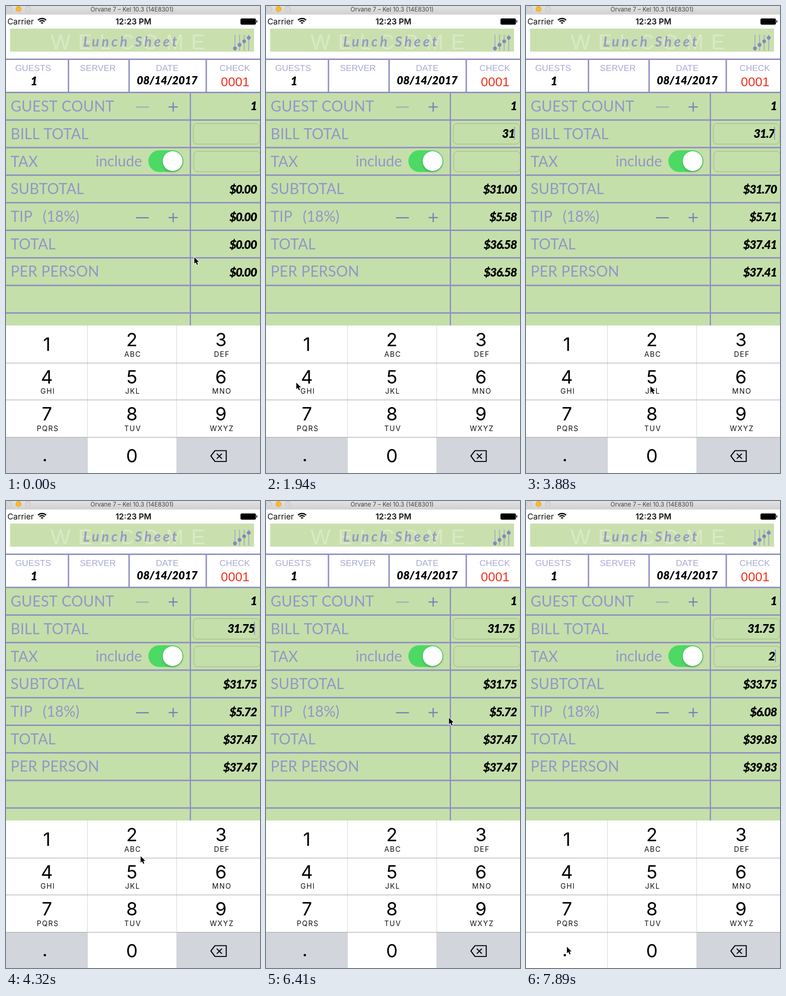
These frames come from a looping animation (553x1013 px, 8000 ms). An HTML page with a canvas:

```html
<!DOCTYPE html>
<html lang="en">
<head>
<meta charset="utf-8">
<title>Bill calculator</title>
<style>
  html, body { margin: 0; width: 100%; height: 100%; overflow: hidden; background: #fff; }
  canvas { display: block; }
</style>
</head>
<body>
<canvas id="stage" width="553" height="1013"></canvas>
<script>
const ctx = document.getElementById('stage').getContext('2d');
const LOOP = 8000, TICK = 149, LAST_TICK = 53, BLINK = 1000 / TICK;
const GREEN = '#c5dfaa', LINE = '#8d8dc4', LABEL = '#9396c9', DARK = '#7d7dba', GREY = '#d2d5db';
const HAND = 'Lato, sans-serif', SANS = '"Liberation Sans", sans-serif', UI = 'Inter, sans-serif';
const ROW = 59.8, KEY_TOP = 693, KEY_HEIGHT = 80.7;

// Each tap: the pointer leaves the last place, arrives, presses one tick later and lets go (in ticks)
const start = { x: 409, y: 544 };
const taps = [
  { key: '3', leave: 0, arrive: 6, release: 9, x: 455, y: 757 },
  { key: '1', leave: 8, arrive: 11, release: 12, x: 55, y: 738 },
  { key: '.', leave: 12, arrive: 15, release: 18, x: 85, y: 972 },
  { key: '7', leave: 20, arrive: 22, release: 24, x: 77, y: 904 },
  { key: '5', leave: 24, arrive: 26, release: 28, x: 270, y: 824 },
  { key: 'tax', leave: 28, arrive: 37, release: 39, x: 469, y: 334 },
  { key: '2', leave: 40, arrive: 49, release: 51, x: 254, y: 740 },
  { key: '.', leave: 51, arrive: 52, release: 54, x: 88, y: 966 }
];
const keys = ['1', '2', '3', '4', '5', '6', '7', '8', '9', '.', '0', 'back'];
const letters = ['', 'ABC', 'DEF', 'GHI', 'JKL', 'MNO', 'PQRS', 'TUV', 'WXYZ'];
const colX = [0, 178, 372, 553];

const money = v => '$' + (Math.round(v * 100 + 1e-6) / 100).toFixed(2);

function rect(x, y, w, h, color) {
  ctx.fillStyle = color;
  ctx.fillRect(x, y, w, h);
}
function text(str, x, y, font, color, align = 'left', spacing = 0) {
  ctx.font = font;
  ctx.fillStyle = color;
  ctx.textAlign = align;
  ctx.letterSpacing = spacing + 'px';
  ctx.fillText(str, x, y);
}
function disc(x, y, r, color) {
  ctx.fillStyle = color;
  ctx.beginPath();
  ctx.arc(x, y, r, 0, 7);
  ctx.fill();
}
function stroke(points, color, width, close) {
  ctx.strokeStyle = color;
  ctx.lineWidth = width;
  ctx.beginPath();
  points.forEach(p => ctx.lineTo(...p));
  if (close) ctx.closePath();
  ctx.stroke();
}
function round(x, y, w, h, r, color) {
  ctx.fillStyle = color;
  ctx.beginPath();
  ctx.roundRect(x, y, w, h, r);
  ctx.fill();
}
function field(x, y) {
  ctx.strokeStyle = '#a8be94';
  ctx.lineWidth = 1.3;
  ctx.beginPath();
  ctx.roundRect(x, y, 144.5, 44.5, 8);
  ctx.stroke();
}
function minus(x, y, color) {
  rect(x - 14, y - 1, 28, 2.6, color);
}
function plus(x, y) {
  rect(x - 10, y - 1.3, 20, 2.6, DARK);
  rect(x - 1.3, y - 10, 2.6, 20, DARK);
}

// What has been typed by tick k, which field has the focus and whether its caret shows
function entryAt(k) {
  const entry = { bill: '', tax: '', focus: 'bill' };
  let lastInput = -4;
  for (const { key, release } of taps) {
    if (release > k) break;
    if (key === 'tax') entry.focus = key;
    else entry[entry.focus] += key;
    lastInput = release;
  }
  entry.caret = (k - lastInput) % BLINK < 3;
  return entry;
}

function drawBars() {
  const shade = ctx.createLinearGradient(0, 0, 0, 19);
  shade.addColorStop(0, '#e2e2e2');
  shade.addColorStop(1, '#d0d0d0');
  rect(0, 0, 553, 18.5, shade);
  ['#d8d8d8', '#fdb92c', '#d8d8d8'].forEach((fill, i) => {
    disc(7 + i * 20.3, 6.5, 6.2, i === 1 ? '#e0a02a' : '#c0c0c0');
    disc(7 + i * 20.3, 6.5, 5.2, fill);
  });
  text('Orvane 7 – Kel 10.3 (14E8301)', 274.5, 12, `13px ${UI}`, '#444', 'center');

  text('Carrier', 3, 40, `17.6px ${UI}`, '#111');
  ctx.strokeStyle = '#000';
  ctx.lineWidth = 2.6;
  for (const r of [12.4, 7.9, 3]) {
    ctx.beginPath();
    ctx.arc(78.5, 39.5, r, -Math.PI * 0.75, -Math.PI * 0.25);
    ctx.stroke();
  }
  text('12:23 PM', 277.5, 40, `600 17.6px ${UI}`, '#111', 'center');
  round(510.5, 27, 33.5, 13.5, 3, '#000');
  rect(545, 31, 2, 5, '#222');
}

function drawHeader() {
  rect(9, 49, 531, 50, '#c9e0ae');
  text('WELCOME', 97, 93.5, `46px ${SANS}`, 'rgba(255,255,255,.3)', 'left', 16.5);
  text('Lunch Sheet', 168, 88, `italic 700 30px ${HAND}`, '#9699c4', 'left', 5);
  for (let i = 0; i < 4; i++) {
    const x = 498.5 + i * 10;
    stroke([[x, 62], [x, 97]], '#9da5bd', 1.6);
    disc(x, 92 - i * 7.7, 4.2, '#8588bb');
  }
  rect(0, 114, 553, 3, LINE);
  for (const x of [136, 268, 436]) rect(x - 1.5, 114, 3, 74, LINE);
  [['GUESTS', 59], ['SERVER', 200], ['DATE', 351], ['CHECK', 498]]
    .forEach(([s, x]) => text(s, x, 141, `19px ${SANS}`, '#a9a9d6', 'center'));
  text('1', 61, 172, `italic 900 26px ${HAND}`, '#000', 'center');
  text('08/14/2017', 351, 170, `italic 900 24px ${HAND}`, '#000', 'center');
  text('0001', 499, 174, `28px ${SANS}`, '#f2301c', 'center');
}

function drawCheck(k) {
  rect(0, 187, 553, 506, GREEN);
  for (let i = 0; i < 9; i++) rect(0, 186 + i * ROW, 553, 3, LINE);
  rect(400, 187, 2.7, 506, LINE);

  const labelFont = `32px ${HAND}`;
  ['GUEST COUNT', 'BILL TOTAL', 'TAX', 'SUBTOTAL', 'TIP', 'TOTAL', 'PER PERSON']
    .forEach((s, i) => text(s, 10, 229.4 + i * 59.65, labelFont, LABEL, 'left', 0.2));
  text('(18%)', 80, 468, labelFont, LABEL);
  text('include', 195, 348, labelFont, LABEL);
  minus(297, 219, '#a5acb8');
  plus(364, 219);
  minus(297, 459, DARK);
  plus(364, 459);

  round(310, 313, 76, 47, 23.5, '#4cd964');
  ctx.shadowColor = 'rgba(0,0,0,.25)';
  ctx.shadowBlur = 4;
  ctx.shadowOffsetY = 2;
  disc(362.7, 336.5, 21.5, '#fff');
  ctx.shadowColor = 'transparent';
  field(407.7, 255);
  field(409, 315);

  const { bill, tax, focus, caret } = entryAt(k);
  const subtotal = Number(bill) + Number(tax), tip = subtotal * 0.18, total = subtotal + tip;
  ['1', bill, tax, money(subtotal), money(tip), money(total), money(total)].forEach((s, i) => {
    const right = i === 1 || i === 2 ? 541 : 545.5;
    text(s, right, 226 + i * 60.2, `italic 900 26px ${HAND}`, '#000', 'right', -1.5);
  });
  if (caret) rect(focus === 'tax' ? 542 : 540, focus === 'tax' ? 322 : 262, 2, 28, '#8f93cc');
}

function drawKeypad(k) {
  keys.forEach((key, i) => {
    const col = i % 3, row = Math.floor(i / 3), top = KEY_TOP + row * KEY_HEIGHT;
    const center = [89, 274, 468][col];
    const pressed = taps.some(tap => tap.key === key && k > tap.arrive && k < tap.release);
    const grey = (key === '.' || key === 'back') !== pressed;
    rect(colX[col], top, colX[col + 1] - colX[col], KEY_HEIGHT, grey ? GREY : '#fff');
    if (key === 'back') return;
    if (key === '.') return disc(84.5, 985, 2.6, '#000');
    text(key, center, top + (letters[i] ? 45 : 55), `40px ${UI}`, '#000', 'center');
    if (letters[i]) text(letters[i], center + 2, top + 67.5, `15.5px ${UI}`, '#111', 'center', 1.6);
  });
  for (const x of [177, 371]) rect(x, KEY_TOP, 1, 320, '#d4d4d6');
  for (let i = 1; i < 4; i++) rect(0, Math.floor(KEY_TOP + i * KEY_HEIGHT + 0.5), 553, 1, '#9c9ca0');

  ctx.lineJoin = 'round';
  stroke([[446, 976], [455, 964.5], [479.5, 964.5], [479.5, 988], [455, 988]], '#000', 2.2, true);
  stroke([[459, 971], [470, 982]], '#000', 2.2);
  stroke([[470, 971], [459, 982]], '#000', 2.2);
}

function drawPointer(k) {
  const i = taps.findLastIndex(tap => tap.leave <= k);
  const to = taps[i], from = taps[i - 1] || start;
  const p = Math.min(1, (k - to.leave) / (to.arrive - to.leave));
  ctx.save();
  ctx.translate(from.x + (to.x - from.x) * p, from.y + (to.y - from.y) * p);
  stroke([[1, 1], [1, 15], [4.2, 12], [6.6, 17.5], [9, 16.4], [6.7, 11.2], [11, 11]], '#fff', 2.2, true);
  ctx.fillStyle = '#000';
  ctx.fill();
  ctx.restore();
}

function frame(now) {
  const k = Math.min(LAST_TICK, Math.floor((now % LOOP + 12) / TICK));
  rect(0, 0, 553, 1013, '#fff');
  drawBars();
  drawHeader();
  drawCheck(k);
  drawKeypad(k);
  drawPointer(k);
  requestAnimationFrame(frame);
}
requestAnimationFrame(frame);
</script>
</body>
</html>
```
